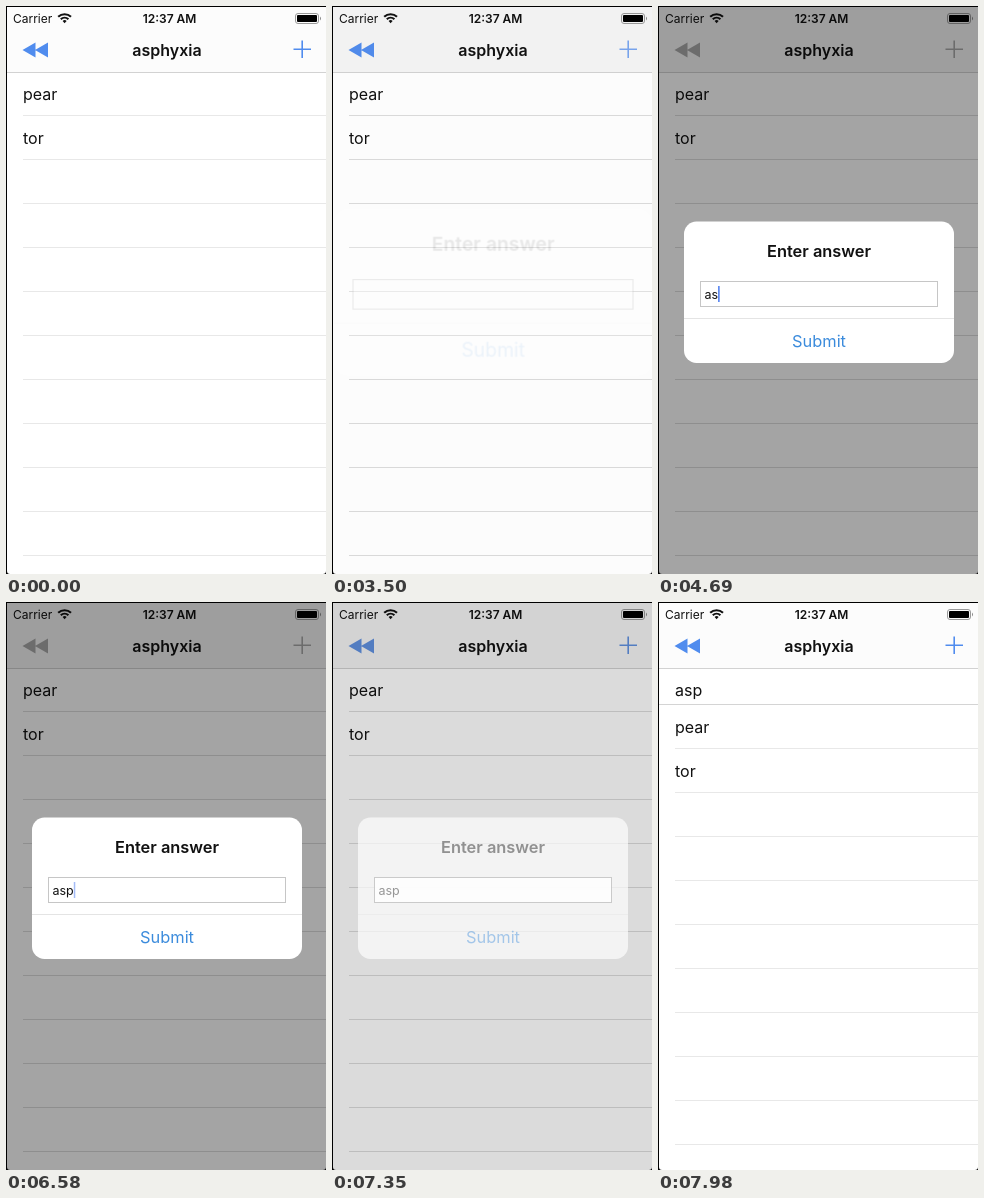
Write an HTML page that moves like this. It is 320 px wide and 568 px high and loops after 8 s.

```html
<!DOCTYPE html>
<html lang="en">
<head>
<meta charset="utf-8">
<style>
  html, body { margin: 0; width: 100%; height: 100%; overflow: hidden; background: #fff; }
  svg { display: block; width: 320px; height: 568px; --bar: #fcfcfc; --line: #e8e8e8; }
  svg.modal { --bar: #f5f5f5; --line: #dcdcdc; }
  text { font: 16px Inter, Roboto, sans-serif; fill: #111; white-space: pre; }
  .bold { font-weight: 600; }
  .status { font-size: 12px; }
  .small { font-size: 12.5px; }
  .large { font-size: 16.4px; }
  .mid { text-anchor: middle; }
  .bar { fill: var(--bar); }
  .line { fill: var(--line); }
</style>
</head>
<body>
<svg id="screen" viewBox="0 0 320 568">
  <rect width="320" height="568" fill="#fff"/>
  <text x="17" y="93.5">asp</text>
  <g id="list">
    <rect y="65" width="320" height="600" fill="#fff"/>
    <rect y="65" width="320" height="1" fill="#d4d4d4"/>
    <text x="17" y="93.5">pear</text>
    <text x="17" y="137.5">tor</text>
  </g>

  <rect class="bar" width="320" height="66"/>
  <rect y="66" width="320" height="1" fill="#d2d2d2"/>
  <text class="status" x="7" y="16.8">Carrier</text>
  <path d="M52.2 10.8a9.2 9.2 0 0 1 12.8 0M54.8 13.3a5.5 5.5 0 0 1 7.6 0" fill="none" stroke="#111" stroke-width="2.1"/>
  <path d="M56.6 14.9a2.9 2.9 0 0 1 4 0l-2 2.3z" fill="#111"/>
  <text class="status bold mid" x="163.5" y="16.8">12:37 AM</text>
  <rect x="289.5" y="7.5" width="23" height="10" rx="2.5" fill="none" stroke="#999"/>
  <rect x="291" y="9" width="20" height="7" rx="1" fill="#000"/>
  <path d="M314 10.5q2 2 0 4z" fill="#888"/>
  <text class="bold mid" x="161" y="50">asphyxia</text>
  <path id="back" d="M16.5 44L29.5 36.5V51.5ZM29 44L42 36.5V51.5Z"/>
  <path id="plus" d="M287.5 43.3H305M296.2 34.6V52" stroke-width="1.6"/>

  <rect id="dim" width="320" height="568"/>

  <g id="alert">
    <rect id="card" x="26" y="215.5" width="270" height="141.5" rx="12.5" fill="#fff"/>
    <rect id="field" x="42.5" y="275.5" width="237" height="25" fill="#fff" stroke="#c6c6c6"/>
    <g id="content">
      <text class="bold large mid" x="161" y="251.3">Enter answer</text>
      <text id="answer" class="small" x="46.5" y="292.5"></text>
      <rect id="caret" y="280" width="1.5" height="16" fill="#4a7bf0"/>
      <rect x="26" y="312" width="270" height="1" fill="#e4e4e4"/>
      <text class="large mid" x="161" y="341" style="fill:#3b8bdc">Submit</text>
    </g>
  </g>

  <path d="M0 0H320V568H0ZM1 1V565q0 3 3 3H317q3 0 3-3V1Z" fill-rule="evenodd"/>
</svg>
<script>
const LOOP = 8000, STEP = 70;
const PRESS = 3130, OPEN = 3456, CLOSE = 7100, INSERT = 7740;
const WORD = 'asp', KEYS = [4340, 4480, 5250];
const BLUE = [80, 140, 238], GREY = [168, 168, 168];

const $ = id => document.getElementById(id);
const [screen, list, back, plus, dim, alertBox, card, field, content, answer, caret] =
  ['screen', 'list', 'back', 'plus', 'dim', 'alert', 'card', 'field', 'content', 'answer', 'caret'].map($);

function set(el, attrs) {
  for (const [name, value] of Object.entries(attrs)) el.setAttribute(name, value);
}

// Row separators
for (let y = 109; y < 568; y += 44) {
  const line = document.createElementNS('http://www.w3.org/2000/svg', 'rect');
  set(line, { class: 'line', x: 17, y, width: 303, height: 1 });
  list.append(line);
}

const clamp = v => Math.min(1, Math.max(0, v));
function ease(t, start, duration) {
  const k = clamp((t - start) / duration);
  return k * k * (3 - 2 * k);
}
const tint = k => `rgb(${BLUE.map((c, i) => Math.round(c + (GREY[i] - c) * k))})`;

// Each key press restarts the soft blink
function caretOpacity(t, lastKey) {
  if (!lastKey || t >= CLOSE) return 0;
  const wave = at => Math.cos(2 * Math.PI * at / 1050);
  return clamp(.5 + 3 * (wave(t - lastKey - 70) - wave(210)));
}

function draw(t) {
  const opened = ease(t, OPEN, 235);
  const show = opened - ease(t, CLOSE, 460);
  const press = ease(t, PRESS, 70) - ease(t, PRESS + 160, 350);
  const keys = KEYS.filter(key => key <= t);
  const color = tint(show * show);

  screen.classList.toggle('modal', show > 0);
  set(alertBox, { transform: `translate(161 286) scale(${1.2 - .2 * opened}) translate(-161 -286)` });
  set(card, { opacity: 1 - (1 - show) ** 2 });
  set(field, { opacity: 1 - (1 - show) ** 4 });
  set(content, { opacity: show });
  set(dim, { opacity: .38 * Math.max(0, show - .06) });
  set(back, { fill: color });
  set(plus, { stroke: color, opacity: 1 - .7 * press });

  answer.textContent = WORD.slice(0, keys.length);
  const width = keys.length ? answer.getComputedTextLength() : 0;
  set(caret, { x: 46.5 + width, opacity: caretOpacity(t, keys.at(-1)) });
  set(list, { transform: `translate(0 ${Math.round(44 * ease(t, INSERT, 325))})` });
}

const start = performance.now();
function tick() {
  const t = (performance.now() - start) % LOOP;
  draw(Math.floor((t + 1) / STEP) * STEP);
  requestAnimationFrame(tick);
}
tick();
</script>
</body>
</html>
```
